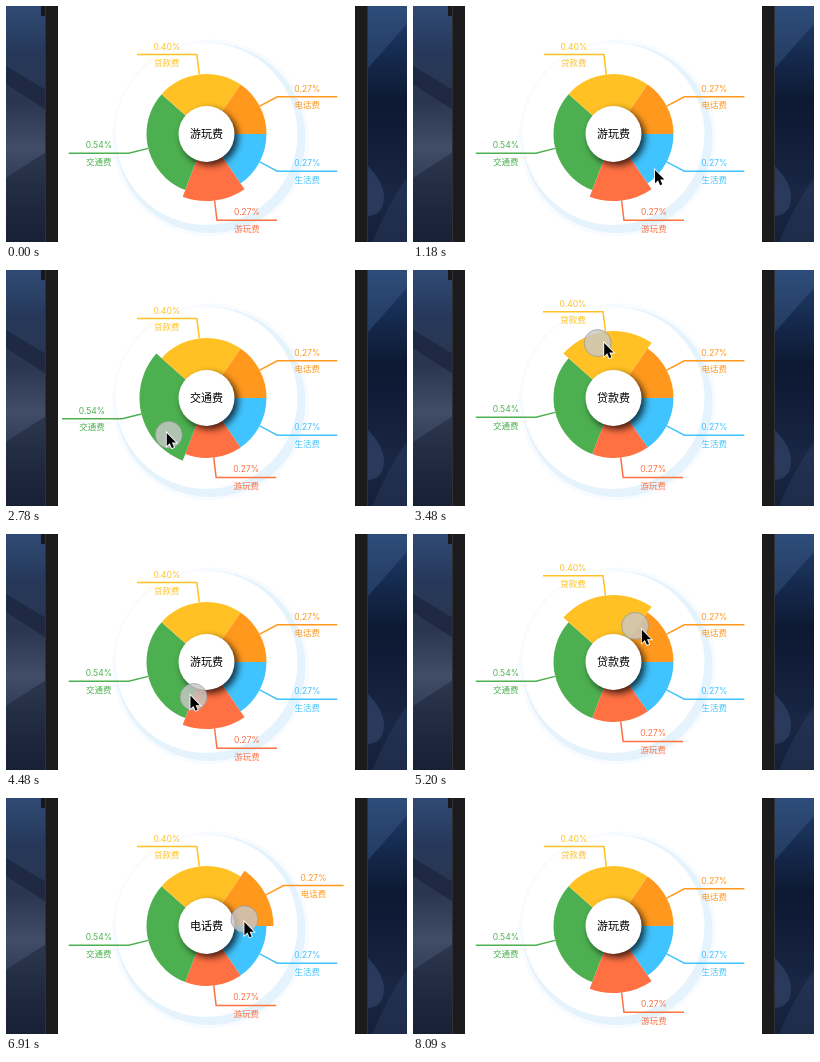
These frames come from a looping animation (401 px wide and 236 px high, 8.16 s). An HTML page with a canvas:

```html
<!DOCTYPE html>
<html lang="zh">
<head>
<meta charset="utf-8">
<title>费用饼图</title>
<style>
  html, body { margin: 0; width: 100%; height: 100%; overflow: hidden; background: #17233f; }
  canvas { display: block; width: 401px; height: 236px; }
</style>
</head>
<body>
<canvas id="stage"></canvas>
<script>
const W = 401, H = 236, LOOP = 8160;
const CX = 200.5, CY = 128, RADIUS = 60, GROW = 7;
const FONT = 'Inter, "Noto Sans CJK SC", "Noto Sans CJK", sans-serif';
const canvas = document.getElementById('stage');
const ctx = canvas.getContext('2d');
const dpr = window.devicePixelRatio || 1;
canvas.width = W * dpr;
canvas.height = H * dpr;

const rad = deg => deg * Math.PI / 180;
const lerp = (a, b, k) => a + (b - a) * k;
const clamp = (v, min = 0, max = 1) => Math.min(max, Math.max(min, v));
const ease = k => k * k * (3 - 2 * k);
const polar = (deg, r) => [CX + r * Math.cos(rad(deg)), CY + r * Math.sin(rad(deg))];

// Slices run clockwise from three o'clock.
const slices = [
  { name: '生活费', weight: 2, color: '#40c4ff' },
  { name: '游玩费', weight: 2, color: '#ff7043' },
  { name: '交通费', weight: 4, color: '#4caf50' },
  { name: '贷款费', weight: 3, color: '#ffc124' },
  { name: '电话费', weight: 2, color: '#ff981c' },
];
const total = slices.reduce((sum, s) => sum + s.weight, 0);
let sweep = 0;
for (const s of slices) {
  s.from = sweep;
  s.to = sweep += s.weight / total * 360;
  s.mid = (s.from + s.to) / 2;
  s.side = Math.sign(Math.cos(rad(s.mid)));
  s.label = (s.weight * 0.134).toFixed(2) + '%';
}

// Pointer times and stops; the touch mark trails the arrow by LAG.
const ENTER = 720, PRESS = 1540, RELEASE = 7350, LEAVE = 7890, LAG = 30;
const ENTRY = [370, 155], START = [241, 163], END = [207, 178], EXIT = [342, 240];

// Three speeding laps round the hub at a slowly swinging distance.
function orbit(t) {
  const s = (t - 1920) / 1000;
  const angle = Math.min(28 + 101 * s + 28 * s * s, 1069);
  return polar(angle, 46 + 11.5 * Math.cos(rad((angle - 230) * 360 / 620)));
}

function glide(a, b, t, from, to) {
  const k = ease(clamp((t - from) / (to - from)));
  return [lerp(a[0], b[0], k), lerp(a[1], b[1], k)];
}

function pointerAt(t) {
  if (t < 1900) return glide(ENTRY, START, t, 690, 1190);
  if (t < 2130) return glide(START, orbit(2130), t, 1900, 2130);
  if (t < 6880) return orbit(t);
  if (t < 7490) return glide(orbit(6880), END, t, 6880, 7360);
  return glide(END, EXIT, t, 7490, LEAVE);
}

function selectedAt(t) {
  if (t < PRESS || t >= RELEASE) return slices[1];
  const [x, y] = pointerAt(t);
  const angle = (Math.atan2(y - CY, x - CX) * 180 / Math.PI + 360) % 360;
  return slices.find(s => angle < s.to) || slices[0];
}

function disc(x, y, r, color) {
  ctx.fillStyle = color;
  ctx.beginPath();
  ctx.arc(x, y, r, 0, 2 * Math.PI);
  ctx.fill();
}

function rect(x, y, w, h, color) {
  ctx.fillStyle = color;
  ctx.fillRect(x, y, w, h);
}

function paint(path, color) {
  ctx.fillStyle = color;
  ctx.fill(new Path2D(path));
}

function gradient(...colors) {
  const g = ctx.createLinearGradient(0, 0, 0, H);
  colors.forEach((c, i) => g.addColorStop(i / (colors.length - 1), c));
  return g;
}

function text(str, x, y, size, color) {
  ctx.font = `${size}px ${FONT}`;
  ctx.fillStyle = color;
  ctx.fillText(str, x, y);
}

function drawBackdrop() {
  rect(0, 0, 60, H, gradient('#2f4a74', '#26385a', '#2a3650', '#414d66', '#2b3650', '#1b243c'));
  paint('M0 60 L40 84 V104 L0 78Z', 'rgba(15,22,40,.4)');
  paint('M0 172 L40 146 V236 H0Z', 'rgba(18,25,44,.4)');
  rect(340, 0, 61, H, gradient('#223f6b', '#162b50', '#0d1932', '#121e3a', '#1a2745', '#141f3a'));
  paint('M362 0 H401 V18 L362 62Z', 'rgba(75,110,155,.3)');
  paint('M362 160 Q378 176 378 192 Q377 209 362 210Z', 'rgba(70,90,130,.4)');
  paint('M401 172 Q382 198 366 236 H401Z', 'rgba(60,80,120,.25)');

  rect(35, 0, 5, 10, '#17181c');
  rect(39, 0, 323, H, '#303135');
  rect(40, 0, 321, H, '#1b1b1d');
  rect(52, 0, 297, H, '#fff');
  disc(CX + 4, CY + 4, 98.5, '#f8fbff');
  disc(CX + 4, CY + 4, 95, '#e5f3fd');
  disc(CX, CY, 91, '#fff');
}

function drawSlice(s, active) {
  const extra = active ? GROW : 0;
  ctx.fillStyle = ctx.strokeStyle = s.color;
  ctx.beginPath();
  ctx.moveTo(CX, CY);
  ctx.arc(CX, CY, RADIUS + extra, rad(s.from), rad(s.to));
  ctx.fill();

  const [x, y] = polar(s.mid, RADIUS + 20 + extra);
  ctx.lineWidth = 1.5;
  ctx.beginPath();
  ctx.moveTo(...polar(s.mid, RADIUS + extra));
  ctx.lineTo(x, y);
  ctx.lineTo(x + 60 * s.side, y);
  ctx.stroke();
  text(s.label, x + 30 * s.side, y - 7.5, 8.5, s.color);
  text(s.name, x + 30 * s.side, y + 9, 8.5, s.color);
}

function drawHub(name) {
  ctx.save();
  ctx.shadowColor = 'rgba(0,0,0,.75)';
  ctx.shadowBlur = 7 * dpr;
  ctx.shadowOffsetX = ctx.shadowOffsetY = 3.5 * dpr;
  disc(CX, CY, 28, '#fff');
  ctx.restore();
  text(name, CX, CY + 0.5, 11, '#000');
}

function drawTouch(t) {
  if (t < PRESS || t >= RELEASE) return;
  disc(...pointerAt(t), 13.5, 'rgba(200,200,200,.8)');
  ctx.strokeStyle = 'rgba(145,145,145,.65)';
  ctx.lineWidth = 1;
  ctx.stroke();
}

function drawCursor(t) {
  if (t < ENTER || t >= LEAVE) return;
  const [x, y] = pointerAt(t + LAG);
  const arrow = new Path2D('M0 0 V15.5 L3.6 12.2 L6 17.8 L8.5 16.8 L6.1 11.3 H11Z');
  ctx.save();
  ctx.translate(x + 1, y + 1);
  ctx.scale(0.85, 0.85);
  ctx.strokeStyle = '#fff';
  ctx.lineWidth = 2;
  ctx.stroke(arrow);
  ctx.fillStyle = '#000';
  ctx.fill(arrow);
  ctx.restore();
}

function frame() {
  const t = performance.now() % LOOP;
  const selected = selectedAt(t);
  ctx.setTransform(dpr, 0, 0, dpr, 0, 0);
  ctx.textAlign = 'center';
  ctx.textBaseline = 'middle';
  drawBackdrop();
  slices.forEach(s => drawSlice(s, s === selected));
  drawHub(selected.name);
  drawTouch(t);
  drawCursor(t);
  requestAnimationFrame(frame);
}
frame();
</script>
</body>
</html>
```
